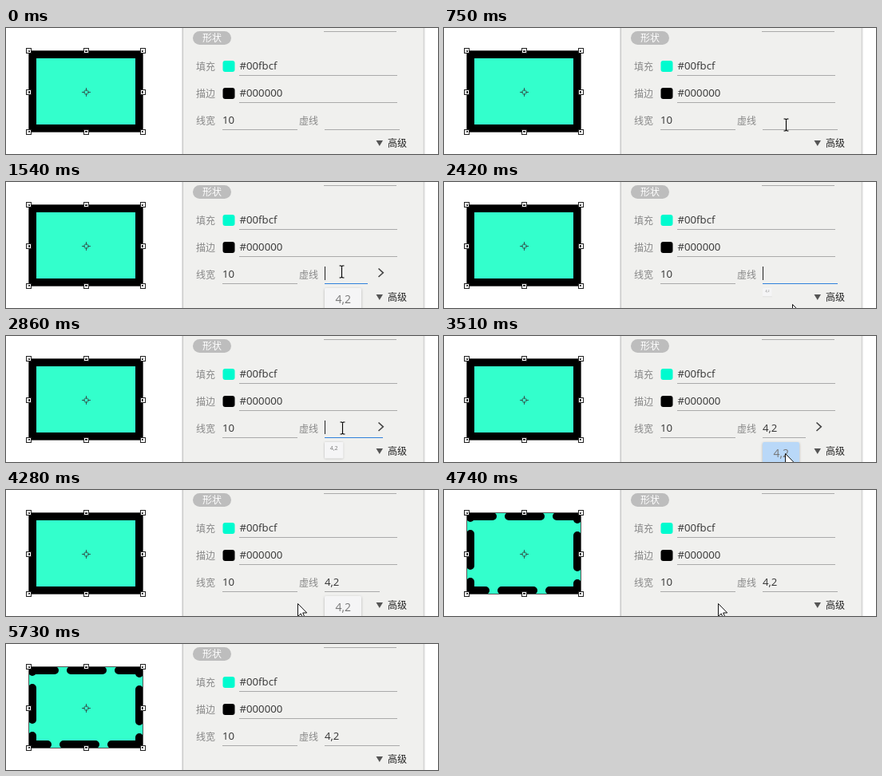
These frames come from a looping animation (541 by 158 pixels, 6280 ms). An HTML page:

```html
<!DOCTYPE html>
<html lang="zh-CN">
<head>
<meta charset="utf-8">
<title>虚线</title>
<style>
html, body { margin: 0; width: 100%; height: 100%; overflow: hidden; background: #fff; }
svg { display: block; }
text { font: 12px "Noto Sans CJK SC", "Noto Sans CJK", sans-serif; fill: #888; }
.val { font: 13.2px "Open Sans", "Noto Sans", sans-serif; fill: #333; }
.rule { stroke: #aaa; shape-rendering: crispEdges; }
.dash path { fill: none; stroke: #000; stroke-width: 10; stroke-linecap: round; stroke-dasharray: 40 20; }
</style>
</head>
<body>
<svg width="541" height="158" viewBox="0 0 541 158">
  <defs>
    <clipPath id="box"><rect x="28" y="28" width="144" height="103"/></clipPath>
    <filter id="soft" x="-30%" y="-30%" width="160%" height="160%">
      <feDropShadow dx="0" dy="1" stdDeviation="1.6" flood-color="#000" flood-opacity=".28"/>
    </filter>
    <filter id="edge" x="-5%" y="-5%" width="110%" height="110%">
      <feDropShadow dx="0" dy="0" stdDeviation="1.5" flood-color="#000" flood-opacity=".6"/>
    </filter>
  </defs>

  <rect x="28" y="28" width="144" height="103" fill="#33ffcc"/>
  <rect id="solid" x="33" y="33" width="134" height="93" fill="none" stroke="#000" stroke-width="10"/>
  <g id="dashed" class="dash" clip-path="url(#box)">
    <path d="M28 33H172" stroke-dashoffset="7"/>
    <path d="M167 28V131" stroke-dashoffset="31"/>
    <path d="M172 126H28"/>
    <path d="M33 131V28" stroke-dashoffset="24"/>
  </g>
  <rect x="28.5" y="28.5" width="143" height="102" fill="none" stroke="#555"/>
  <g id="handles"></g>
  <g fill="none" stroke="#333" stroke-width=".8">
    <circle cx="100.5" cy="80.5" r="2.8" stroke-width=".7"/>
    <path d="M95 80.5H99M102 80.5H106M100.5 75V79M100.5 82V86"/>
  </g>

  <rect x="222" y="-10" width="300.5" height="180" fill="#f0f0ee" filter="url(#edge)"/>
  <rect x="234" y="4" width="48" height="17" rx="8.5" fill="#bdbdbd"/>
  <text x="246" y="17" style="fill:#fff">形状</text>
  <text x="238" y="53">填充</text>
  <text x="238" y="87">描边</text>
  <text x="238" y="121">线宽</text>
  <text x="367" y="121">虚线</text>
  <rect x="271.5" y="41" width="15" height="14" rx="3" fill="#00fbcf"/>
  <rect x="271.5" y="75" width="15" height="14" rx="3"/>
  <text class="val" x="292.5" y="52">#00fbcf</text>
  <text class="val" x="292.5" y="86">#000000</text>
  <text class="val" x="271" y="120">10</text>
  <path class="rule" d="M398 4.5H489M292 59.5H490M292 93.5H490M271 127.5H365"/>
  <path d="M463.5 141H472L467.75 148Z" fill="#555"/>
  <text x="478" y="149" style="fill:#222">高级</text>

  <path id="line" class="rule"/>
  <text id="value" class="val" x="399" y="120">4,2</text>
  <path id="caret" d="M399.5 106V123" stroke="#222" shape-rendering="crispEdges"/>
  <path id="chevron" d="M466.5 108.5L472.3 113.8L466.5 119" fill="none" stroke="#444" stroke-width="1.6"/>
  <g id="popup" filter="url(#soft)">
    <rect id="item" width="46" height="40" rx="2"/>
    <text class="val" x="13.5" y="19" style="font-size:14px;fill:#777">4,2</text>
  </g>
  <path id="beam" d="M-3 -7.5H-1L0 -6.5L1 -7.5H3M0 -6.5V6.5M-3 7.5H-1L0 6.5L1 7.5H3" fill="none" stroke="#000" stroke-width="1.1"/>
  <path id="arrow" d="M.5 .5V16.5L4.2 13L6.8 18.8L9.2 17.8L6.7 12H11.7Z" fill="#fff" stroke="#111"/>
</svg>
<script>
const LOOP = 6280;
const $ = id => document.getElementById(id);

// Bursts of change: start, last step, number of steps, optional curve of the pointer.
const bursts = [
  [430, 990, 6, [562, 178, 385, 106, 420, 112]],
  [1310, 1540, 3],
  [1860, 2420, 6, [420, 112, 430, 125, 436, 153]],
  [2520, 3080, 6, [436, 153, 415, 92, 424, 126]],
  [3200, 3510, 4, [427, 147, 427, 147, 427, 147]],
  [3960, 4500, 6, [427, 147, 386, 140, 343, 142]],
  [4620, 4740, 2],
  [5270, 5730, 5, [343, 142, 418, 146, 493, 160]]
];

const ramp = (t, start, length) => Math.min(1, Math.max(0, (t - start) / length));
const smooth = u => u * u * (3 - 2 * u);
const within = (t, a, b) => t >= a && t < b;
const show = (id, on) => $(id).setAttribute("visibility", on ? "visible" : "hidden");

function bezier([x0, y0, x1, y1, x2, y2], u) {
  const mix = (a, b, c) => a * (1 - u) ** 2 + 2 * b * u * (1 - u) + c * u * u;
  return [mix(x0, x1, x2), mix(y0, y1, y2)];
}

// Latest step reached, and the pointer's place at that step.
function sample(time) {
  let now = 0, pointer = null;
  for (const [start, end, count, curve] of bursts) {
    if (time < start) break;
    const gap = (end - start) / (count - 1);
    const k = Math.min(count - 1, Math.floor((time - start + 6) / gap));
    now = start + k * gap;
    if (curve) pointer = bezier(curve, 1 - (1 - (k + 1) / count) ** 1.25);
  }
  return { now, pointer };
}

function drawPointer(pointer) {
  const inField = pointer && pointer[1] < 128 && pointer[0] > 395 && pointer[0] < 494;
  show("beam", inField);
  show("arrow", pointer && !inField && pointer[1] < 159);
  if (!pointer) return;
  const [x, y] = pointer.map(Math.round);
  $("beam").setAttribute("transform", `translate(${x + .5} ${y + .5})`);
  $("arrow").setAttribute("transform", `translate(${x} ${y})`);
}

function render(time) {
  const { now, pointer } = sample(time);

  const applied = now >= 4390;
  show("solid", !applied);
  show("dashed", applied);

  const hover = smooth(ramp(now, 690, 300)) - smooth(ramp(now, 2080, 300))
    + smooth(ramp(now, 2700, 300)) - smooth(ramp(now, 4160, 300));
  const focus = within(now, 1310, 3300);
  $("line").setAttribute("d", `M399 127.5H${Math.round(493 - 40 * hover)}`);
  $("line").style.stroke = focus ? "#2f80dc" : "#aaa";
  show("caret", focus);
  show("value", now >= 3300);
  show("chevron", within(now, 760, 2080) || within(now, 2740, 4160));

  const open = ramp(now, 1310, 230) - ramp(now, 2190, 310)
    + ramp(now, 2720, 270) - ramp(now, 4520, 220);
  show("popup", open > .01);
  $("popup").setAttribute("transform", `translate(399 133) scale(${Math.max(open, .01)})`);
  $("item").setAttribute("fill", within(now, 3195, 4060) ? "#b9d8f8" : "#f5f5f6");

  drawPointer(pointer);
}

for (const y of [28, 80, 130])
  for (const x of [28, 100, 171])
    if (x !== 100 || y !== 80)
      $("handles").innerHTML += `<g transform="translate(${x + .5} ${y + .5})" fill="none" shape-rendering="crispEdges">
        <rect x="-3" y="-3" width="6" height="6" stroke="#222"/>
        <rect x="-2" y="-2" width="4" height="4" stroke="#fff"/></g>`;

const begin = performance.now();
function tick() {
  render((performance.now() - begin) % LOOP);
  requestAnimationFrame(tick);
}
tick();
</script>
</body>
</html>
```
